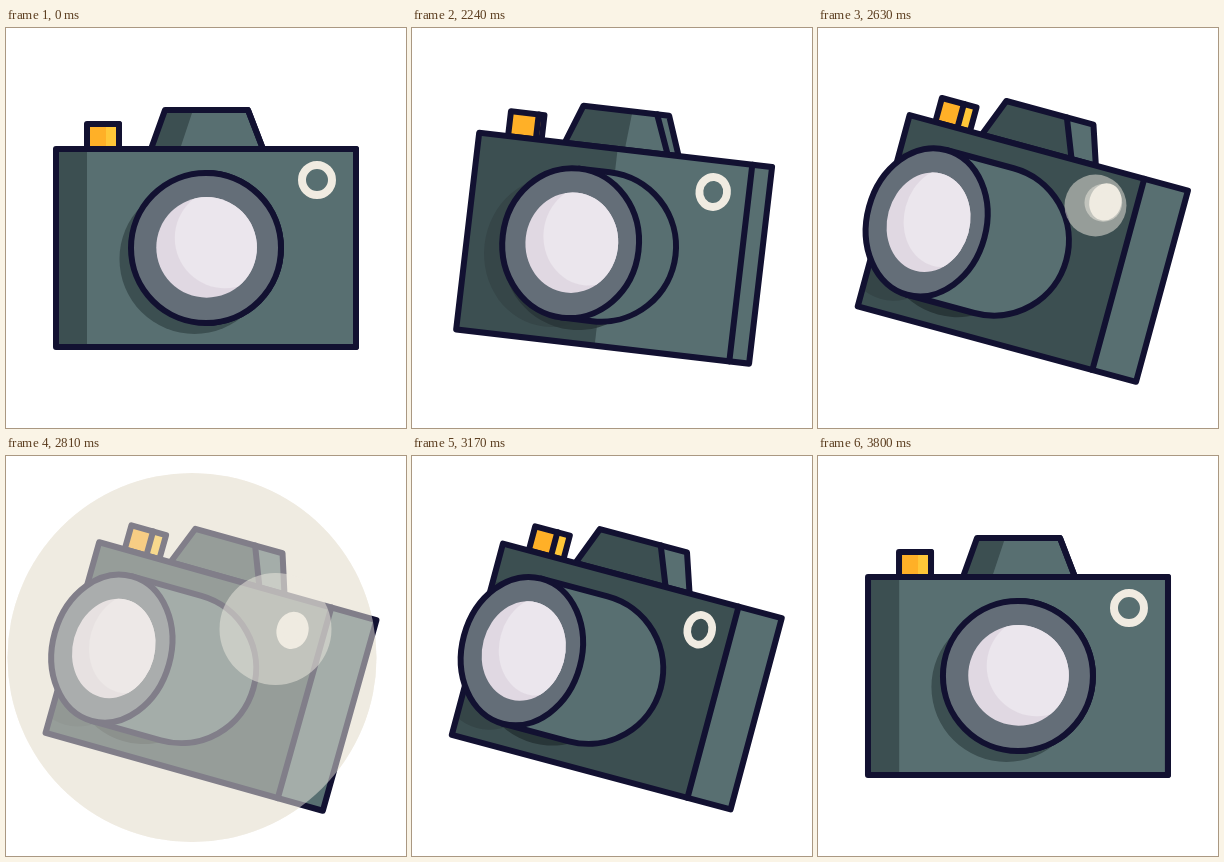
Write an HTML page with a canvas that moves like this. It is 400x400 px and loops after 3830 ms.

```html
<!DOCTYPE html>
<html lang="en">
<head>
<meta charset="utf-8">
<title>Camera</title>
<style>
  html, body { margin: 0; width: 100%; height: 100%; overflow: hidden; background: #fff; }
  canvas { display: block; width: 100vmin; height: 100vmin; }
</style>
</head>
<body>
<canvas id="stage" width="400" height="400"></canvas>
<script>
const c = document.getElementById('stage').getContext('2d');
const INK = '#121131', LIGHT = '#586f71', DARK = '#3c4f51', CREAM = '#f0ebe1';
const LOOP = 3830, START = 2030, STEP = 30;

const mix = (a, b, k) => a + (b - a) * k;
const clamp = x => Math.min(1, Math.max(0, x));

// Cubic easing curve with control points (x1, 0) and (x2, 1)
function ease(x, x1, x2) {
  x = clamp(x);
  if (x === 0 || x === 1) return x;
  let lo = 0, hi = 1;
  for (let i = 0; i < 24; i++) {
    const s = (lo + hi) / 2, r = 1 - s;
    if (3 * s * r * r * x1 + 3 * s * s * r * x2 + s ** 3 < x) lo = s; else hi = s;
  }
  return lo * lo * (3 - 2 * lo);
}

const turnAt = t => t < 2900
  ? ease((t - 2000) / 800, 0.294, 0.266)
  : 1 - ease((t - 2950) / 860, 0.747, 0.744);

const flashAt = t => t < 2830
  ? ease((t - 2590) / 200, 0.4, 0.5)
  : 1 - ease((t - 2850) / 200, 0.4, 0.5);

function poly(...pts) {
  const path = new Path2D();
  for (let i = 0; i < pts.length; i += 2) path.lineTo(pts[i], pts[i + 1]);
  path.closePath();
  return path;
}

const box = (l, t, r, b) => poly(l, t, r, t, r, b, l, b);

function oval(x, y, rx, ry = rx) {
  const path = new Path2D();
  path.ellipse(x, y, rx, ry, 0, 0, 7);
  return path;
}

function fill(path, color) {
  c.fillStyle = color;
  c.fill(path);
}

function stroke(path, color = INK, width = 6) {
  c.strokeStyle = color;
  c.lineWidth = width;
  c.stroke(path);
}

function line(x1, y1, x2, y2) {
  stroke(poly(x1, y1, x2, y2));
}

function clipped(path, draw) {
  c.save();
  c.clip(path);
  draw();
  c.restore();
}

function button(p) {
  const left = -119 + 1.5 * p, split = -87 - 8 * p, right = -87 + 5.5 * p;
  const shade = Math.min(split, -100 + 20 * p);
  const shape = box(left, -124, right, -99);
  fill(shape, '#ffc738');
  fill(box(left, -124, shade, -99), '#ffb027');
  stroke(shape);
  line(split, -124, split, -99);
}

function finder(p) {
  const bl = -55 - 15 * p, tl = -41 - 14 * p;
  const tr = 42 - 6.5 * p, br = 57 - 8.5 * p;
  const splitTop = 42 - 35 * p, splitBottom = 57 - 34.5 * p;
  const shape = poly(bl, -99, tl, -138, tr, -138, br, -99);
  fill(shape, LIGHT);
  fill(poly(bl, -99, tl, -138,
    Math.min(splitTop, -13 + 36 * p), -138,
    Math.min(splitBottom, -26 + 59 * p), -99), DARK);
  stroke(shape);
  line(splitTop, -138, splitBottom, -99);
}

function shadows(p, x, rx) {
  const k = clamp(p * 2);
  fill(oval(x - 11.5 - 13 * p, 11, rx, 75),
    `rgb(${mix(60, 53, k)},${mix(79, 69, k)},${mix(81, 71, k)})`);
  c.globalAlpha = k;
  fill(oval(x - 11.5 + 48 * p, 11, 75), '#283638');
}

function lens(p) {
  const rx = 75 * (1 - 0.21 * p), x = -103 * p, base = -31 * p;
  const barrel = new Path2D();
  barrel.moveTo(x, -75);
  barrel.arc(base, 0, 75, -Math.PI / 2, Math.PI / 2);
  barrel.lineTo(x, 75);
  barrel.closePath();
  fill(barrel, LIGHT);
  stroke(barrel);

  const rim = oval(x, 0, rx, 75);
  fill(rim, '#646e78');
  stroke(rim);

  const squash = 1 - 0.185 * p, mid = x + 0.6 + 1.2 * p;
  const glass = oval(mid, -0.6, 50.3 * squash, 50.3);
  fill(glass, '#e0d8e2');
  clipped(glass, () => fill(oval(mid + 18.5 * squash, -10, 50.3 * squash, 50.3), '#ebe6ed'));
}

function camera(p, lit) {
  const half = 150 - 6 * p, split = -half + 300 - 58.8 * p;
  const body = box(-half, -99, half, 99), front = box(-half, -99, split, 99);
  button(p);
  finder(p);
  fill(body, LIGHT);
  fill(box(-half, -99, Math.min(split, -half + 31 + 255 * p), 99), DARK);
  clipped(front, () => shadows(p, -103 * p, 75 * (1 - 0.21 * p)));
  stroke(body);
  line(split, -99, split, 99);
  lens(p);

  const ring = oval(111 - 45 * p, -68 + 1.5 * p, 15 * (1 - 0.19 * p), 15);
  if (lit) fill(ring, CREAM);
  stroke(ring, CREAM, 8 - p * 0.5);
}

function draw(t) {
  const p = turnAt(t), k = flashAt(t), angle = p * 15.7 * Math.PI / 180;
  const glow = (x, y, r) => oval(mix(287, x, k), mix(175, y, k), mix(15, r, k));
  const wide = glow(186, 201.5, 184.5), near = glow(269.5, 173, 56);

  c.clearRect(0, 0, 400, 400);
  c.lineJoin = c.lineCap = 'round';
  if (k > 0) fill(wide, CREAM);

  c.save();
  c.translate(200 + 5 * p, 220 + 0.5 * p);
  c.rotate(angle);
  camera(p, k > 0);
  c.restore();

  if (k > 0) {
    c.globalAlpha = 0.5;
    fill(wide, CREAM);
    fill(near, CREAM);
    c.globalAlpha = 1;
  }
}

const begin = performance.now();
function tick() {
  const t = (performance.now() - begin) % LOOP;
  draw(t < START ? 0 : START + Math.floor((t - START) / STEP) * STEP);
  requestAnimationFrame(tick);
}
tick();
</script>
</body>
</html>
```
